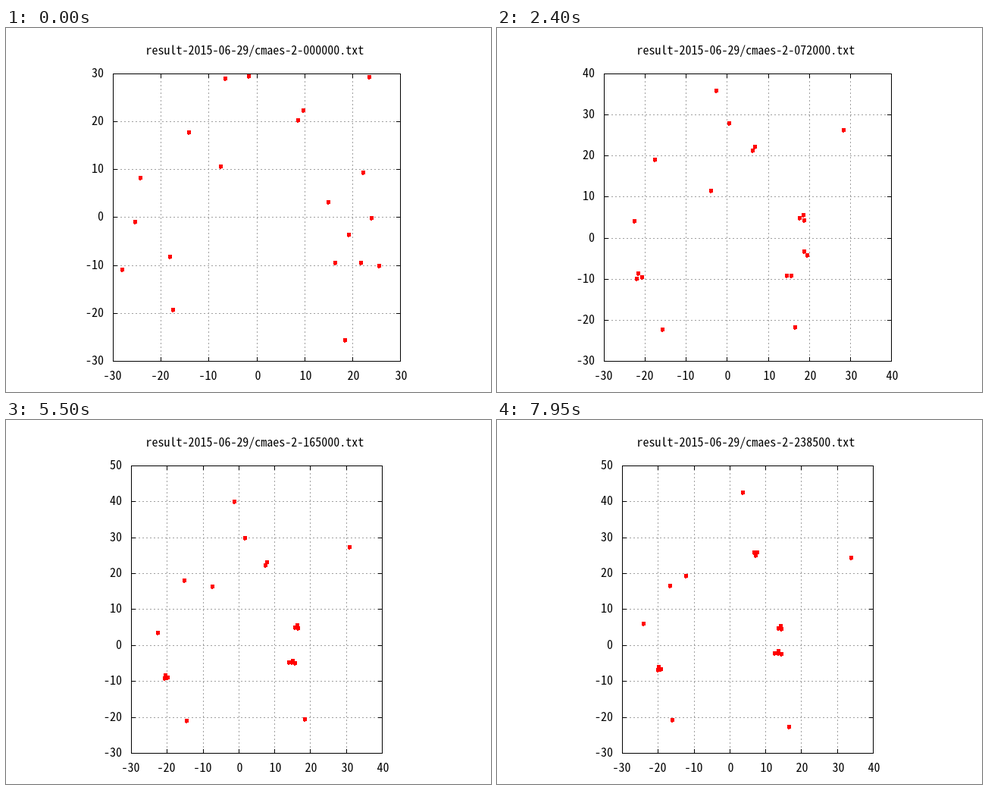
An HTML page with a canvas that plays this animation: 640 px wide and 480 px high, repeating every 8000 ms.

```html
<!DOCTYPE html>
<html lang="en">
<head>
<meta charset="utf-8">
<title>Scatter plot</title>
<style>
html, body { margin: 0; width: 100%; height: 100%; overflow: hidden; background: #fff; }
canvas { display: block; }
</style>
</head>
<body>
<canvas id="stage" width="640" height="480"></canvas>
<script>
const ctx = document.getElementById("stage").getContext("2d");
const LOOP = 8000, STEP = 50;
const MIN = -30, TOP = 60, BOTTOM = 439, CENTER = 330.5;
const SETTLED = 3600, LATE = 5500, LEAVE = 6500, END = 7950;
const CLOSE = 0.5;

// Half-width glyphs: pick the size that gives 8 px per character.
const FAMILY = '"Noto Sans Mono CJK JP", "Noto Sans Mono", monospace';
ctx.font = `16px ${FAMILY}`;
const FONT = `${16 * 8 / ctx.measureText("0").width}px ${FAMILY}`;

const between = (t, from, to) => t >= from && t < to;
const progress = (t, from, to) => Math.min(1, Math.max(0, (t - from) / (to - from)));
const mix = (a, b, k) => a.map((v, i) => v + (b[i] - v) * k);
const settle = t => 1 - (1 - progress(t, 0, SETTLED)) ** 3;

// Each dot or flock visits four places, in plot units, with a rest at the third.
const travel = (start, middle, late, end) => t =>
  t < SETTLED ? mix(start, middle, settle(t)) :
  t < LEAVE ? mix(middle, late, progress(t, SETTLED, LATE)) :
  mix(late, end, progress(t, LEAVE, END));

const loner = (...places) => {
  const at = travel(...places);
  return t => [at(t)];
};

// A flock is a ring of dots that closes in on its moving centre.
const flock = (count, spread, degrees, ...places) => {
  const at = travel(...places);
  return t => {
    const [cx, cy] = at(t);
    const radius = spread + (CLOSE - spread) * settle(t);
    return Array.from({ length: count }, (_, i) => {
      const angle = degrees * Math.PI / 180 + i * 2 * Math.PI / count;
      return [cx + radius * Math.cos(angle), cy + radius * Math.sin(angle)];
    });
  };
};

const swarm = [
  loner([-6.5, 29], [-2.5, 36.2], [-1.3, 40.1], [3.6, 42.6]),
  loner([-1.6, 29.5], [0.5, 28], [1.7, 30], [6.7, 26]),
  loner([23.5, 29.4], [28.5, 26.2], [31, 27.5], [33.8, 24.5]),
  loner([-14.2, 17.8], [-17.8, 19.1], [-15.1, 18.1], [-16.7, 16.7]),
  loner([-7.5, 10.7], [-3.8, 11.6], [-7.3, 16.5], [-12.3, 19.4]),
  loner([-24.3, 8.3], [-22.5, 4], [-22.7, 3.6], [-24.1, 6.1]),
  loner([-17.5, -19.2], [-15.7, -22.4], [-14.5, -20.9], [-16, -20.7]),
  loner([18.4, -25.6], [16.5, -21.6], [18.5, -20.5], [16.5, -22.6]),
  flock(2, 1.2, 60, [9.2, 21.4], [6.3, 21.8], [7.6, 22.7], [7.4, 25.5]),
  flock(2, 4.5, -45, [22.4, -6.8], [19, -3.5], [15.3, -4.5], [14, -1.9]),
  flock(2, 2.7, 0, [19.1, -9.4], [14.9, -9.2], [14.4, -4.7], [13, -2.2]),
  flock(3, 6, 105, [-23.9, -6.6], [-21.4, -9.4], [-20.4, -8.7], [-19.7, -6.5]),
  flock(3, 5.5, 70, [20.4, 4.2], [18.3, 5], [16.2, 5.2], [14, 4.9])
];

function axesAt(t) {
  const xMax = t < 1500 || between(t, 2650, 5250) ? 30 : 40;
  const yMax = t < 200 ? 30 : t < 5450 || between(t, 6100, 6300) ? 40 : 50;
  const height = BOTTOM - TOP;
  const half = height * (xMax - MIN) / (yMax - MIN) / 2;
  const left = Math.round(CENTER - half), right = Math.floor(CENTER + half);
  return {
    xMax, yMax, left, right,
    x: v => left + Math.round((v - MIN) / (xMax - MIN) * (right - left)),
    y: v => BOTTOM - Math.round((v - MIN) / (yMax - MIN) * height)
  };
}

function text(string, x, y, align) {
  ctx.textAlign = align;
  ctx.fillText(string, x, y);
}

function drawGrid({ xMax, yMax, left, right, x, y }) {
  ctx.fillStyle = "#a0a0a0";
  for (let v = MIN + 10; v < xMax; v += 10)
    for (let py = TOP; py < BOTTOM; py += 5) ctx.fillRect(x(v), py, 1, 2);
  for (let v = MIN + 10; v < yMax; v += 10)
    for (let px = left; px < right; px += 5) ctx.fillRect(px, y(v), 2, 1);
}

function drawAxes({ xMax, yMax, left, right, x, y }) {
  ctx.fillStyle = "#000";
  for (let v = MIN; v <= xMax; v += 10) {
    ctx.fillRect(x(v), TOP, 1, 6);
    ctx.fillRect(x(v), BOTTOM - 5, 1, 6);
    text(v, x(v) + (v < 0 ? -0.5 : 1.5), 464, "center");
  }
  for (let v = MIN; v <= yMax; v += 10) {
    ctx.fillRect(left, y(v), 6, 1);
    ctx.fillRect(right - 5, y(v), 6, 1);
    text(v, left - 12, y(v) + 5, "right");
  }
  ctx.strokeRect(left + 0.5, TOP + 0.5, right - left, BOTTOM - TOP);
}

function drawDot(x, y) {
  ctx.fillRect(x - 2, y - 2, 5, 5);
  ctx.fillRect(x - 1, y - 2, 2, 6);
}

function draw(t) {
  const axes = axesAt(t);
  ctx.fillStyle = "#fff";
  ctx.fillRect(0, 0, 640, 480);
  ctx.font = FONT;
  drawGrid(axes);
  drawAxes(axes);
  const count = String(t * 30).padStart(6, "0");
  text(`result-2015-06-29/cmaes-2-${count}.txt`, 184.5, 35, "left");
  ctx.fillStyle = "#f00";
  for (const [x, y] of swarm.flatMap(dots => dots(t))) drawDot(axes.x(x), axes.y(y));
}

const start = performance.now();
function tick() {
  const t = (performance.now() - start) % LOOP;
  draw(Math.floor(t / STEP) * STEP);
  requestAnimationFrame(tick);
}
tick();
</script>
</body>
</html>
```
